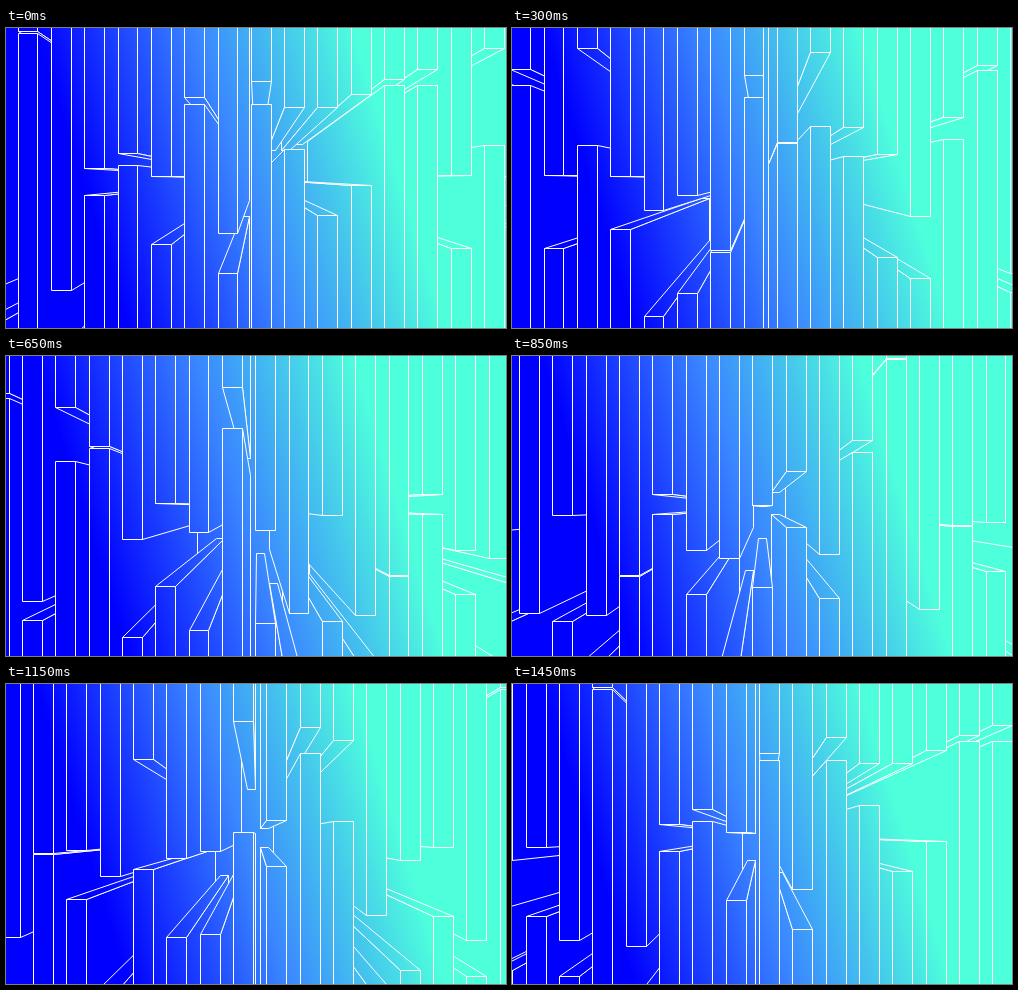
Animation of 500 by 300 pixels, one loop 1500 ms. Source, as an HTML page with a canvas:

```html
<!DOCTYPE html>
<html lang="en">
<head>
<meta charset="utf-8">
<title>Columns</title>
<style>
  html, body { margin: 0; width: 100%; height: 100%; overflow: hidden; background: #00f; }
  canvas { display: block; width: 500px; height: 300px; }
</style>
</head>
<body>
<canvas id="stage" width="500" height="300"></canvas>
<script>
const ctx = document.getElementById('stage').getContext('2d');

const STEP = 50, STEPS = 30;
const VX = 250, VY = 150, DEPTH = 0.4;   // vanishing point, back plane scale
const COUNT = 62, PITCH = 33.32, WIDTH = 19.85, START = 11.6;
const SPEED = COUNT * PITCH / STEPS;     // the whole row passes once per loop

function seeded(seed) {
  return () => {
    seed = seed + 0x6D2B79F5 | 0;
    let t = Math.imul(seed ^ seed >>> 15, 1 | seed);
    t = t + Math.imul(t ^ t >>> 7, 61 | t) ^ t;
    return ((t ^ t >>> 14) >>> 0) / 2 ** 32;
  };
}

// Each column: a hanging bar down to `top`, a gap, a standing bar from `bottom`.
const random = seeded(7);
const columns = Array.from({ length: COUNT }, () => {
  const top = Math.round(random() * 268);
  const gap = Math.round(1 + 111 * random() ** 1.6);
  return { top, bottom: top + gap };
});

// The slanted colours stay fixed on the stage while the bars pass through them.
const SLANT = 0.31, REACH = 159;
const dx = REACH / (1 + SLANT * SLANT), dy = -SLANT * dx;
const paint = ctx.createLinearGradient(235 - dx, VY - dy, 235 + dx, VY + dy);
['#0000ff', '#3a86ff', '#4effdc'].forEach((color, i) => paint.addColorStop(i / 2, color));

const back = ([x, y]) => [VX + (x - VX) * DEPTH, VY + (y - VY) * DEPTH];
const snap = v => Math.round(v) + 0.5;

function face(...corners) {
  ctx.beginPath();
  for (const [x, y] of corners) ctx.lineTo(snap(x), snap(y));
  ctx.closePath();
  ctx.fill();
  ctx.stroke();
}

// A box from the near plane to the back plane; `far` lies off stage.
function box(x, end, far) {
  const left = [x, end], right = [x + WIDTH, end];
  const side = x > VX ? left : x + WIDTH < VX ? right : null;
  if (side) {
    const out = [side[0], far];
    face(side, out, back(out), back(side));
  }
  if ((end < VY) === (far < end)) face(left, right, back(right), back(left));
  face(left, right, [x + WIDTH, far], [x, far]);
}

function draw(step) {
  ctx.fillStyle = paint;
  ctx.strokeStyle = '#fff';
  ctx.lineWidth = 1;
  ctx.lineJoin = 'bevel';
  ctx.fillRect(0, 0, 500, 300);

  const shift = START - step * SPEED;
  const first = Math.floor(-shift / PITCH) - 3;
  const bars = Array.from({ length: 22 }, (_, i) => {
    const k = first + i;
    return { x: shift + k * PITCH, ...columns[(k + COUNT) % COUNT] };
  });

  // Outer bars first, so that those nearer the middle cover them.
  const reach = b => Math.abs(b.x + WIDTH / 2 - VX);
  bars.sort((a, b) => reach(b) - reach(a));

  for (const { x, top, bottom } of bars) {
    const pair = [[top, -300], [bottom, 600]];
    if (top > VY) pair.reverse();
    for (const [end, far] of pair) box(x, end, far);
  }
}

let shown = -1;
function tick() {
  const step = Math.floor(performance.now() / STEP) % STEPS;
  if (step !== shown) draw(shown = step);
  requestAnimationFrame(tick);
}
tick();
</script>
</body>
</html>
```
